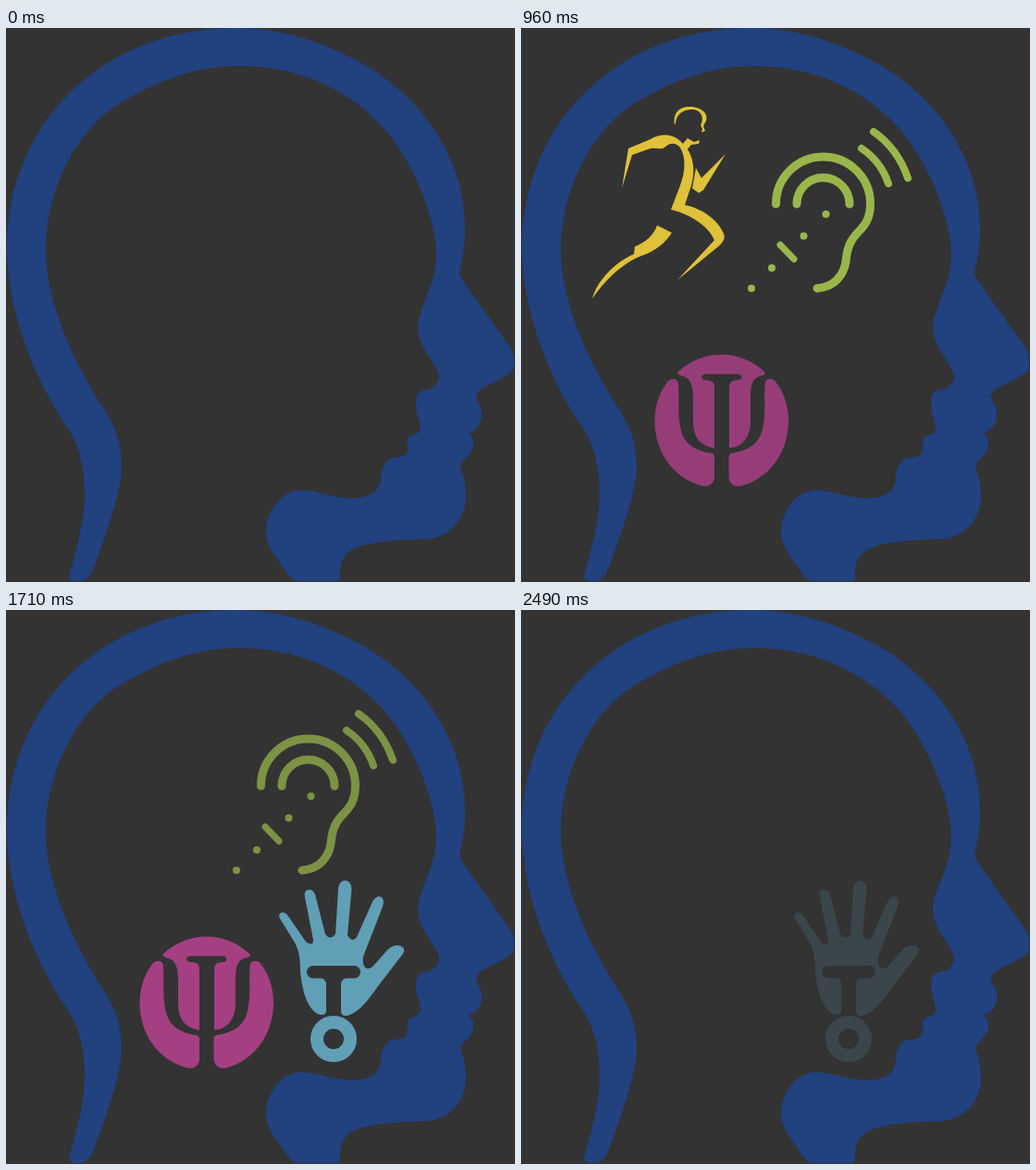
An HTML page that plays this animation: 550x598 px, repeating every 2.55 s.

```html
<!DOCTYPE html>
<html lang="en">
<head>
<meta charset="utf-8">
<title>Head with four icons</title>
<style>
  html, body { margin: 0; width: 100%; height: 100%; overflow: hidden; background: #333; }
  svg { display: block; width: 550px; height: 598px; }
  .part { opacity: 0; }
  .line { fill: none; stroke-linecap: round; }
  .cut { fill: #333; }
</style>
</head>
<body>
<svg viewBox="0 0 550 598">
  <path id="head" fill="#21417f" d="M68 592
    C75 564 85 536 85 501 C84 466 77 446 64 428 C30 377 1 304 1 238
    C1 96 112 0 247 0 C292 0 333 12 371 31 C450 69 496 143 496 215
    C496 239 493 251 490 264 Q491 270 496 276 L540 338 Q549 350 549 357
    C550 367 548 371 541 375 C528 383 514 387 509 394
    C505 401 514 405 514 416 C515 427 508 435 500 437
    C502 441 506 442 505 449 C505 460 495 465 491 471
    C492 479 497 486 497 505 C497 532 477 552 450 552
    C417 552 389 556 376 562 C362 570 361 579 361 592 Q361 597 356 597
    H316 Q309 596 304 589 C294 573 281 561 281 543
    C281 522 298 499 318 499 C338 499 354 508 376 507.500
    C393 507 402 500 404 492 C406 482 404 475 413 466
    C419 461 426 466 432 460 C437 454 431 446 436 441
    C441 439 447 438 448 432 C448 424 443 417 443 405
    C443 397 445 393 450 391 C459 391 468 385 468 376
    C468 365 445 345 445 324 C445 302 465 279 465 243
    C464 213 450 171 428 135 C393 77 328 41 252 41
    C207 41 162 56 117 85 C75 114 43 176 43 239
    C43 294 71 358 107 413 C118 430 125 449 125 473
    C125 501 107 549 95 582 Q90 597 78 597 Q67 597 68 592Z"/>

  <g class="part" fill="#dfc13a">
    <path d="M166 104 C164 92 171 85 182 85 C194 85 203 92 200 100 L197 106 L199 111 L195 113 L196 109 L194 105 C198 98 196 90 187 88 C176 87 168 92 167 103Z"/>
    <path d="M174 126 L180 119 L187 123 L193 121 L192 125 L184 126 L178 133Z"/>
    <path d="M109 173 L116 130 L140 120 C150 114 164 113 174 124 C186 135 189 151 184 170 L177 191 C196 195 213 207 219 222 C221 227 219 231 213 236 L169 272 L209 229 C203 215 186 202 162 196 L172 170 C178 154 178 139 172 129 C166 123 161 124 155 129 C150 132 145 129 140 130 L120 137Z"/>
    <path d="M185 173 L189 151 L195 162 L221 136 L197 175 L192 178Z"/>
    <path d="M147 213 L163 221 C156 232 145 241 130 246 C119 250 98 262 77 292 C83 270 105 251 122 244 L123 236 C135 231 144 223 147 213Z"/>
  </g>

  <g class="part" fill="#9ab64b" stroke="#9ab64b" stroke-width="9">
    <path class="line" d="M275.500 190 A51 51 0 0 1 377.500 190 C377 222 355 216 351.500 248 C350 268 337 280 320 281"/>
    <path class="line" d="M298 190 A28.500 28.500 0 0 1 355 190"/>
    <path class="line" stroke-width="8" d="M368 130 Q389 144 397 168 M381 112 Q407 130 418 162"/>
    <path class="line" stroke-width="7" d="M280 234 L295 249.500"/>
    <g stroke="none">
      <circle cx="329.500" cy="201" r="4"/>
      <circle cx="305.500" cy="224.500" r="4"/>
      <circle cx="271" cy="259" r="4"/>
      <circle cx="249" cy="281" r="4"/>
    </g>
  </g>

  <g class="part" fill="#a43f82">
    <path d="M170 371 C184 358 200 352.500 217 352.500 C233 352.500 250 359 263 371 Q265 374 261 375 C250 377 248 384 248 400 V425 C248 441 240 451 228 453 Q217 455 206 453 C193 450 186 441 186 425 V400 C186 384 183 377 172 375 Q168 373 170 371Z"/>
    <path class="cut" d="M198 373.500 H236 Q241 377 236 380 C228 380 225 382 225 388 V495 H209 V388 C209 382 206 380 198 380 Q192 377 198 373.500Z"/>
    <path id="side" d="M160 380 Q170 376 170 386 C171 400 169 415 172 430 C175 448 186 456 206 459 Q210 460 209 467 V485 C208 493 202 496 195 494 C165 486 144.500 458 144.500 424 C144.500 406 151 390 160 380Z"/>
    <use href="#side" transform="matrix(-1 0 0 1 433.500 0)"/>
  </g>

  <g class="part" fill="#609fb6">
    <path d="M296 333 C293 327 299 324 304 329 L324 358 Q332 364 332 356 L323 310 C321 300 331 299 334 307 L345 350 Q350 357 356 350 L359 301 C360 289 373 289 373.500 301 L369 351 Q374 360 379 353 L396 315 C401 305 411 309 407 320 L386 374 C384 388 392 390 398 383 L413 366 C422 358 434 363 429 371 L402 406 C391 422 379 437 367 438 Q362 438 362 433 L346 432 Q346 437 341 437 C328 436 320 414 318 390 C318 378 317 368 312 359Z"/>
    <rect class="cut" x="325" y="384" width="58" height="13.500" rx="6.500"/>
    <path class="cut" d="M338 397 Q346 397 346 405 V440 H362 V405 Q362 397 370 397Z"/>
    <circle class="line" cx="354" cy="463" r="18" stroke="#609fb6" stroke-width="14"/>
  </g>
</svg>
<script>
  const LOOP = 2550, FADE = 330;
  const FADE_IN = [30, 330, 670, 990];
  const FADE_OUT = [1320, 1620, 1920, 2220];
  const parts = document.querySelectorAll('.part');
  const ramp = (t, start) => Math.min(1, Math.max(0, (t - start) / FADE));

  function draw() {
    const t = performance.now() % LOOP;
    parts.forEach((part, i) => {
      part.style.opacity = ramp(t, FADE_IN[i]) - ramp(t, FADE_OUT[i]);
    });
    requestAnimationFrame(draw);
  }
  draw();
</script>
</body>
</html>
```
